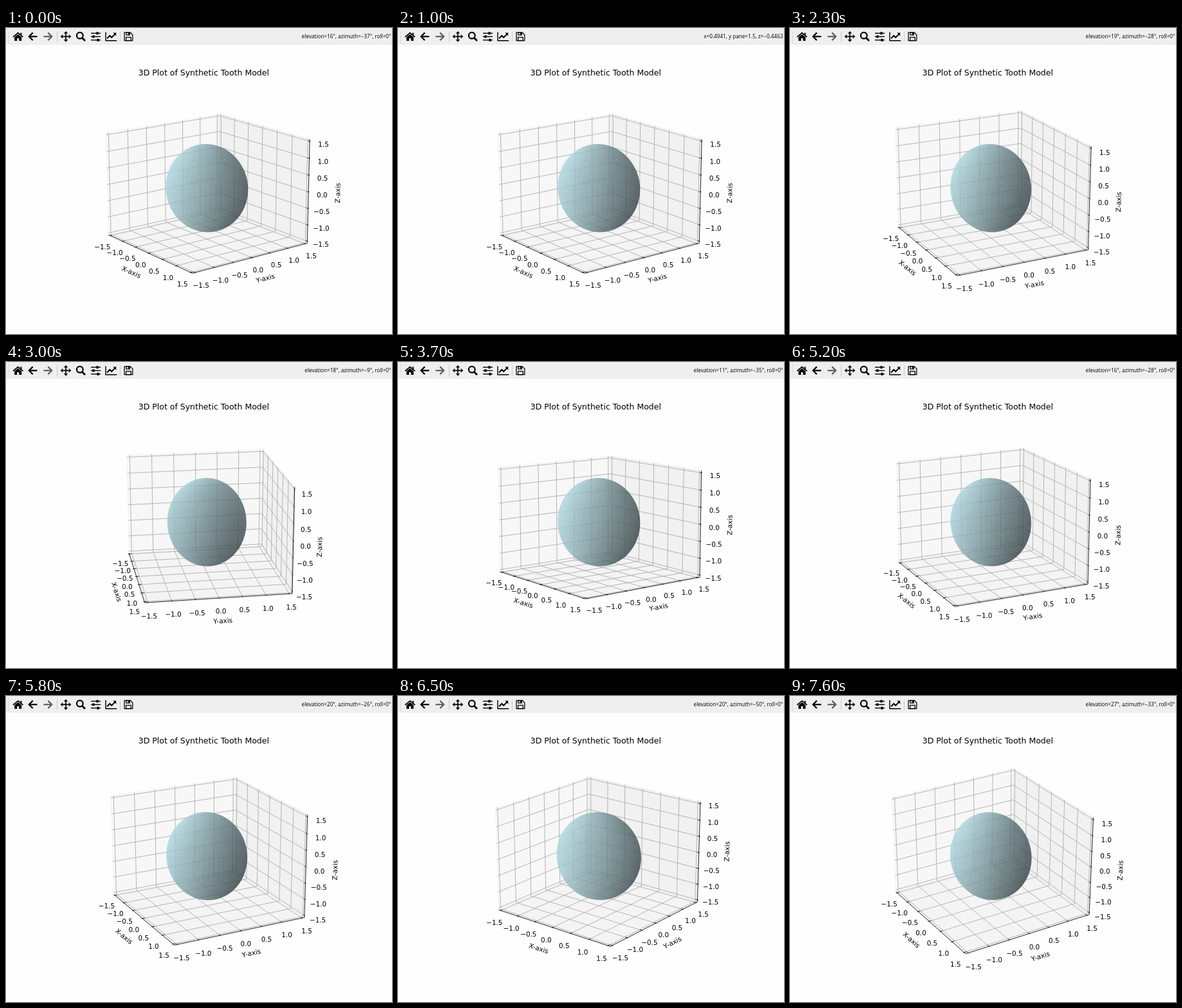
An HTML page with a canvas that plays this animation: 600 by 477 pixels, repeating every 8.1 s.

```html
<!DOCTYPE html>
<html lang="en">
<head>
<meta charset="utf-8">
<title>3D Plot of Synthetic Tooth Model</title>
<style>
  html, body { margin: 0; width: 100%; height: 100%; overflow: hidden; background: #fefdff; }
  canvas { display: block; }
</style>
</head>
<body>
<canvas id="stage" width="600" height="477"></canvas>
<script>
const ctx = document.getElementById('stage').getContext('2d');
const LOOP = 8100, STEP = 100;
const STATUS_LAG = 50;                 // the readout trails the drawn view
const PT = 75 / 72;                    // one typographic point in pixels
const CX = 312.2, CY = 249.6, FOCAL = 1873, DIST = 10;
const UNIT = [8 / 21, 8 / 21, 2 / 7];  // box units per data unit
const LIM = 1.5625;
const TICKS = [-1.5, -1, -0.5, 0, 0.5, 1, 1.5];
const LABEL_GAP = 0.2074, TITLE_GAP = 0.4509;
const PLOT_FONT = '"DejaVu Sans", sans-serif';
const PAPER = '#fefdff', GRID = '#b0b0b0';

// time, azimuth, elevation
const KEYS = [
  [1900, -37.4, 16.1], [2300, -26.8, 19.2], [2600, -16, 19.5], [2850, -8.6, 18.5],
  [3000, -9.5, 18], [3300, -14, 16], [3700, -38, 10.5], [4000, -49, 6],
  [4300, -59.3, 2.8], [4550, -60, 5], [4850, -45, 13], [5200, -25.6, 16.9],
  [5500, -19, 19], [5900, -31, 20.4], [6500, -51.1, 19.8], [6800, -41.5, 24],
  [7100, -31.4, 27.1]
];
const LAST = KEYS.length - 1;

function slope(i, c) {
  const a = KEYS[Math.max(0, i - 1)], b = KEYS[Math.min(LAST, i + 1)];
  return (b[c] - a[c]) / (b[0] - a[0]);
}

function viewAt(t) {
  if (t <= KEYS[0][0]) return KEYS[0].slice(1);
  if (t >= KEYS[LAST][0]) return KEYS[LAST].slice(1);
  const i = KEYS.findIndex(k => k[0] > t) - 1;
  const a = KEYS[i], b = KEYS[i + 1], d = b[0] - a[0], u = (t - a[0]) / d;
  const v = 1 - u;
  return [1, 2].map(c =>
    (1 + 2 * u) * v * v * a[c] + u * v * v * d * slope(i, c) +
    u * u * (3 - 2 * u) * b[c] - u * u * v * d * slope(i + 1, c));
}

const dot = (a, b) => a[0] * b[0] + a[1] * b[1] + a[2] * b[2];

function makeCamera(azim, elev) {
  const a = azim * Math.PI / 180, e = elev * Math.PI / 180;
  const ca = Math.cos(a), sa = Math.sin(a), ce = Math.cos(e), se = Math.sin(e);
  const right = [-sa, ca, 0], up = [-se * ca, -se * sa, ce], toEye = [ce * ca, ce * sa, se];
  const project = p => {
    const q = p.map((v, i) => v * UNIT[i]);
    const s = FOCAL / (DIST - dot(q, toEye));
    return [CX + dot(q, right) * s, CY - dot(q, up) * s];
  };
  return { right, up, toEye, project };
}

function trace(points, close) {
  ctx.beginPath();
  points.forEach(p => ctx.lineTo(p[0], p[1]));
  if (close) ctx.closePath();
}

function line(points, color, width) {
  trace(points);
  ctx.strokeStyle = color;
  ctx.lineWidth = width;
  ctx.stroke();
}

function fill(points, color) {
  trace(points, true);
  ctx.fillStyle = color;
  ctx.fill();
}

function text(str, x, y, size, align = 'center', family = PLOT_FONT) {
  ctx.font = `${size}px ${family}`;
  ctx.textAlign = align;
  ctx.fillStyle = '#000';
  ctx.fillText(str, x, y);
}

const number = (v, digits) => v.toFixed(digits).replace('-', '\u2212');

function drawPanes(project) {
  const L = LIM;
  const panes = [
    [242, [[-L, -L, -L], [-L, L, -L], [-L, L, L], [-L, -L, L]]],
    [230, [[-L, L, -L], [L, L, -L], [L, L, L], [-L, L, L]]],
    [236, [[-L, -L, -L], [L, -L, -L], [L, L, -L], [-L, L, -L]]]
  ];
  for (const [g, corners] of panes) {
    const color = `rgba(${g},${g},${g},0.5)`;
    fill(corners.map(project), color);
    ctx.strokeStyle = color;
    ctx.lineWidth = PT;
    ctx.stroke();
  }
  for (const v of TICKS) {
    const paths = [
      [[v, -L, -L], [v, L, -L], [v, L, L]],
      [[L, v, -L], [-L, v, -L], [-L, v, L]],
      [[L, L, v], [-L, L, v], [-L, -L, v]]
    ];
    paths.forEach(p => line(p.map(project), GRID, 0.95));
  }
}

// signs: which side of the box the axis runs along; tickDir: direction of its ticks
const AXES = [
  { name: 'X-axis', index: 0, signs: [0, -1, -1], tickDir: 1 },
  { name: 'Y-axis', index: 1, signs: [1, 0, -1], tickDir: 0 },
  { name: 'Z-axis', index: 2, signs: [1, 1, 0], tickDir: 0 }
];

function drawAxis({ name, index, signs, tickDir }, project) {
  const at = (v, gap = 0) => signs.map((s, i) => i === index ? v : s * (LIM + gap));
  const from = project(at(-LIM)), to = project(at(LIM));
  line([from, to], '#000', 0.8 * PT);
  for (const v of TICKS) {
    const outer = at(v), inner = at(v);
    outer[tickDir] += signs[tickDir] * 0.025;
    inner[tickDir] -= signs[tickDir] * 0.05;
    line([project(outer), project(inner)], '#000', 0.8 * PT);
    const [x, y] = project(at(v, LABEL_GAP));
    text(number(v, 1), x, y + 7.9, 10 * PT);
  }
  let angle = Math.atan2(from[1] - to[1], to[0] - from[0]) * 180 / Math.PI;
  angle = ((angle % 180) + 180) % 180;
  if (angle > 90) angle -= 180;
  const [x, y] = project(at(0, TITLE_GAP));
  ctx.save();
  ctx.translate(x, y);
  ctx.rotate(-angle * Math.PI / 180);
  text(name, 0, 2.9, 10 * PT);
  ctx.restore();
}

// Translucent ellipsoid, shaded per facet
const RADII = [0.959, 0.859, 1.288];
const SEMI = RADII.map((r, i) => r * UNIT[i]);
const LIGHT = [-2 / 3, -2 / 3, 1 / 3];
const BLUE = [173, 216, 224];
const ALPHA = 0.56, FACETS = 49;
const SIZE = 150, LEFT = 237, TOP = 175;
const body = document.createElement('canvas');
body.width = body.height = SIZE;
const bodyCtx = body.getContext('2d');

function grain(i, j) {
  const s = Math.sin(i * 127.1 + j * 311.7) * 43758.5453;
  return s - Math.floor(s) - 0.5;
}

// Brightness of each facet, indexed by longitude and latitude
const SHADES = Array.from({ length: FACETS * FACETS }, (_, k) => {
  const i = k % FACETS, j = Math.floor(k / FACETS);
  const lon = (i + 0.5) / FACETS * 2 * Math.PI, lat = (j + 0.5) / FACETS * Math.PI;
  const n = [Math.sin(lat) * Math.cos(lon), Math.sin(lat) * Math.sin(lon), Math.cos(lat)]
    .map((v, c) => v / RADII[c]);
  return 0.65 + 0.35 * dot(n, LIGHT) / Math.hypot(...n) + 0.025 * grain(i, j);
});

function shade(x, y, z) {
  const lon = (Math.atan2(y, x) / (2 * Math.PI) + 1) % 1;
  const lat = Math.acos(Math.max(-1, Math.min(1, z))) / Math.PI;
  const i = Math.min(FACETS - 1, Math.floor(lon * FACETS));
  const j = Math.min(FACETS - 1, Math.floor(lat * FACETS));
  return SHADES[j * FACETS + i];
}

function drawBody(cam) {
  const scaled = v => v.map((c, i) => c / SEMI[i]);
  const r = scaled(cam.right), u = scaled(cam.up), w = scaled(cam.toEye);
  const A = dot(w, w), scale = FOCAL / DIST;
  const image = bodyCtx.createImageData(SIZE, SIZE);
  for (let py = 0; py < SIZE; py++) {
    for (let px = 0; px < SIZE; px++) {
      const sx = (LEFT + px + 0.5 - CX) / scale, sy = (CY - TOP - py - 0.5) / scale;
      const p = r.map((c, i) => c * sx + u[i] * sy);
      const B = dot(p, w), disc = B * B - A * (dot(p, p) - 1);
      const rho = Math.sqrt(Math.max(0, 1 - disc / A));
      const cover = Math.max(0, Math.min(1, (1 - rho) * 66 + 0.5));
      if (!cover) continue;
      const root = Math.sqrt(Math.max(0, disc));
      const shadeAt = t => shade(p[0] + w[0] * t, p[1] + w[1] * t, p[2] + w[2] * t);
      const front = shadeAt((-B + root) / A), back = shadeAt((-B - root) / A);
      const tone = (front + back * (1 - ALPHA)) / (2 - ALPHA);
      const o = (py * SIZE + px) * 4;
      BLUE.forEach((c, i) => { image.data[o + i] = c * tone; });
      image.data[o + 3] = 255 * cover * (1 - (1 - ALPHA) ** 2);
    }
  }
  bodyCtx.putImageData(image, 0, 0);
  ctx.drawImage(body, LEFT, TOP);
}

function arrow(x, dir, color) {
  line([[x - dir * 6.5, 13.3], [x + dir * 5.5, 13.3]], color, 2.2);
  line([[x + dir * 0.3, 7.4], [x + dir * 6.2, 13.3], [x + dir * 0.3, 19.2]], color, 2.2);
}

function drawToolbar() {
  ctx.fillStyle = '#f0eff0';
  ctx.fillRect(0, 0, 600, 25);
  ctx.fillStyle = '#ecebec';
  ctx.fillRect(0, 25, 600, 1);
  ctx.fillStyle = '#c4c4c4';
  for (let y = 4; y < 23; y += 3) ctx.fillRect(3.5, y, 1.2, 1.2);
  for (const x of [79, 177]) ctx.fillRect(x, 5, 0.8, 17);

  // home
  line([[11, 14], [18.7, 7.6], [26.4, 14]], '#000', 1.7);
  ctx.fillStyle = '#000';
  ctx.fillRect(22.4, 7.5, 2, 4);
  fill([[13.2, 14.2], [18.7, 9.8], [24.2, 14.2], [24.2, 20], [20.2, 20],
    [20.2, 16], [17.2, 16], [17.2, 20], [13.2, 20]], '#000');

  arrow(42, -1, '#000');
  arrow(65, 1, '#5c5c5c');

  // pan
  for (let k = 0; k < 4; k++) {
    ctx.save();
    ctx.translate(93, 13.3);
    ctx.rotate(k * Math.PI / 2);
    line([[0, 0], [0, -6]], '#000', 1.7);
    fill([[0, -8.4], [3.3, -4.8], [-3.3, -4.8]], '#000');
    ctx.restore();
  }

  // zoom
  ctx.beginPath();
  ctx.arc(114.8, 11.8, 4.9, 0, 2 * Math.PI);
  ctx.strokeStyle = '#000';
  ctx.lineWidth = 2.2;
  ctx.stroke();
  line([[118.4, 15.4], [123, 20]], '#000', 2.8);

  // sliders
  [[8.2, 142], [13.4, 136], [18.8, 143]].forEach(([y, knob]) => {
    line([[132, y], [147.2, y]], '#000', 1.4);
    ctx.fillStyle = '#000';
    ctx.fillRect(knob - 1.6, y - 2, 3.2, 4);
  });

  // chart
  line([[155, 6.6], [155, 19.8], [172.3, 19.8]], '#000', 1.4);
  line([[157, 16.4], [161.3, 12], [164.2, 14.8], [169.5, 9.4]], '#000', 2);
  fill([[166.4, 7.6], [171.2, 7.6], [171.2, 12.4]], '#000');

  // save
  trace([[184, 7.1], [193.4, 7.1], [196.8, 10.5], [196.8, 19.7], [184, 19.7]], true);
  ctx.strokeStyle = '#000';
  ctx.lineWidth = 1.3;
  ctx.stroke();
  ctx.strokeRect(186.6, 14.5, 7.6, 5.2);
  ctx.strokeRect(187, 7.1, 5.4, 3.8);
  ctx.fillStyle = '#000';
  ctx.fillRect(190, 7.5, 2, 3);
}

function statusAt(t) {
  if (t >= 500 && t < 2000) {
    const k = Math.min(5, (t - 500) / STEP);
    return `x=${number(0.9126 - 0.0837 * k, 4)}, y pane=1.5, z=${number(-0.2318 - 0.0429 * k, 4)}`;
  }
  const [azim, elev] = viewAt(Math.min(t, KEYS[LAST][0]) - STATUS_LAG);
  return `elevation=${number(elev, 0)}°, azimuth=${number(azim, 0)}°, roll=0°`;
}

function draw(t) {
  const cam = makeCamera(...viewAt(t));
  ctx.fillStyle = PAPER;
  ctx.fillRect(0, 0, 600, 477);
  drawToolbar();
  text(statusAt(t), 598.5, 16.3, 8.2, 'right', '"Open Sans", "Noto Sans", sans-serif');
  drawPanes(cam.project);
  AXES.forEach(axis => drawAxis(axis, cam.project));
  drawBody(cam);
  text('3D Plot of Synthetic Tooth Model', 307.3, 73.8, 12 * PT);
}

let shown = -1;
const start = performance.now();
function tick() {
  const elapsed = (performance.now() - start) % LOOP;
  const t = Math.floor(elapsed / STEP) * STEP;
  if (t !== shown) draw(shown = t);
  requestAnimationFrame(tick);
}
tick();
</script>
</body>
</html>
```
